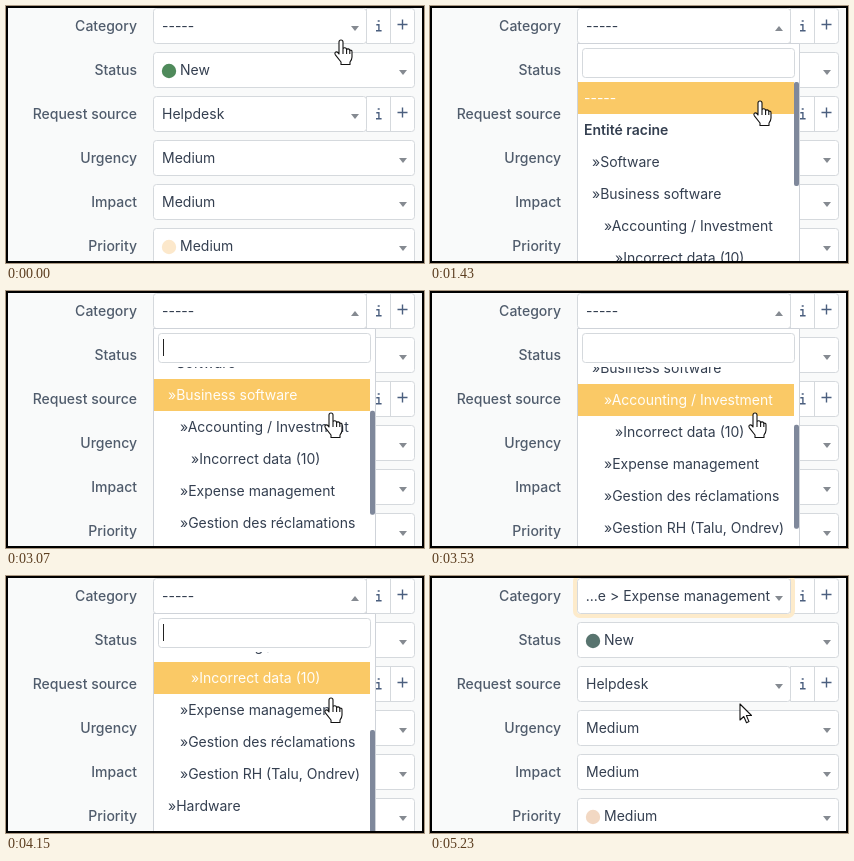
Write an HTML page that moves like this. It is 418 px wide and 257 px high and loops after 5590 ms.

```html
<!DOCTYPE html>
<html lang="en">
<head>
<meta charset="utf-8">
<title>Category picker</title>
<style>
  html, body { margin: 0; width: 100%; height: 100%; overflow: hidden; background: #f9fafa; }
  svg { display: block; }
  text { font: 14px Inter, sans-serif; fill: #343f50; white-space: pre; }
  .label { font-weight: 500; fill: #505c6c; text-anchor: end; }
  .group { font-weight: 600; }
  .active { fill: #fffdf8; }
  .box { fill: #fff; stroke: #d5d9dd; }
  .icon { fill: none; stroke: #4b5f7f; stroke-width: 1.4; }
  .arrow { fill: #858a91; }
  .cursor { fill: #fff; stroke: #111; stroke-width: 1.1; stroke-linejoin: round; }
</style>
</head>
<body>
<svg width="418" height="257" viewBox="0 0 418 257">
  <defs><clipPath id="listClip"><rect x="148" y="76" width="222" height="181"/></clipPath></defs>
  <rect width="418" height="257" fill="#f9fafa"/>
  <g id="form"></g>
  <rect id="glow" x="145" y="0" width="218" height="40" rx="5" fill="none" stroke="#fdebcb" stroke-width="4"/>
  <g id="panel">
    <path d="M147.5 37.5H369.5V276H147.5Z" fill="#fff" stroke="#cfd3d9"/>
    <rect class="box" x="152.5" y="42.5" width="212" height="29" rx="3"/>
    <path id="caret" d="M157.5 48V65" stroke="#222"/>
    <g clip-path="url(#listClip)">
      <g id="list"></g>
      <rect id="thumb" x="364" y="76" width="5" height="104" rx="2" fill="#7f889b"/>
    </g>
  </g>
  <g id="cursor" class="cursor">
    <path id="hand" d="M-2 14V2Q-2 0 0 0T2 2V9Q2.3 7.6 4 7.8T5.6 9.8Q6 8.6 7.4 8.9T8.8 10.8Q9.2 9.9 10.2 10.3T11 12V17Q11 19.5 9 22V24.5H0V22L-5.6 14.8Q-6.8 12.8 -5.2 12T-2 14ZM2 9V14M5.6 10V14M8.8 11V14"/>
    <path id="pointer" d="M0 0V16L3.8 12.5L6.5 18.7L9 17.6L6.4 11.5H11.5Z"/>
  </g>
  <rect x="1" y="1" width="416" height="255" fill="none" stroke="#000" stroke-width="2"/>
</svg>
<script>
const LOOP = 5590, ROW = 32;
const $ = id => document.getElementById(id);

const fields = [
  { label: "Category", value: "-----", id: "category", buttons: true },
  { label: "Status", value: "New", dot: "statusDot" },
  { label: "Request source", value: "Helpdesk", buttons: true },
  { label: "Urgency", value: "Medium" },
  { label: "Impact", value: "Medium" },
  { label: "Priority", value: "Medium", dot: "priorityDot" }
];
// label and x position of each option
const options = [
  ["-----", 154], ["Entité racine", 154], ["»Software", 162], ["»Business software", 162],
  ["»Accounting / Investment", 174], ["»Incorrect data (10)", 185], ["»Expense management", 174],
  ["»Gestion des réclamations", 174], ["»Gestion RH (Talu, Ondrev)", 174], ["»Hardware", 162]
];

const buttons = y => `
  <path class="box" d="M360.5 ${y - 17.5}H405.5Q408.5 ${y - 17.5} 408.5 ${y - 14.5}V${y + 14.5}Q408.5 ${y + 17.5} 405.5 ${y + 17.5}H360.5ZM384.5 ${y - 17.5}v35"/>
  <path class="icon" d="M371.7 ${y - 5}h2M370.3 ${y - 1.3}h2.6v6M370 ${y + 4.8}h5.6M391.5 ${y - 1.5}h10M396.5 ${y - 6.5}v10"/>`;

$("form").innerHTML = fields.map((f, i) => {
  const y = 20 + 44 * i, right = f.buttons ? 360.5 : 408.5, id = f.id || "field" + i;
  return `<text class="label" x="131" y="${y + 5}">${f.label}</text>
    ${f.buttons ? buttons(y) : ""}
    <rect class="box" x="147.5" y="${y - 17.5}" width="${right - 147.5}" height="35" rx="3"/>
    ${f.dot ? `<circle id="${f.dot}" cx="163" cy="${y + 1}" r="7.2"/>` : ""}
    <text id="${id}" x="${f.dot ? 174 : 156}" y="${y + 5}">${f.value}</text>
    <path id="${id}Arrow" class="arrow" d="M${right - 15.5} ${y}h8l-4 5z"/>`;
}).join("");

$("list").innerHTML = options.map(([name, x], i) => `
  <rect x="148" y="${76 + ROW * i}" width="216" height="${ROW}" fill="none"/>
  <text class="${i === 1 ? "group" : ""}" x="${x}" y="${97 + ROW * i}">${name}</text>`).join("");
const bars = $("list").querySelectorAll("rect"), names = $("list").querySelectorAll("text");

// progress that jumps n times from start to end, the first jump at start
function steps(t, start, end, n) {
  if (t < start) return 0;
  return Math.min(1, (Math.floor((t - start) / (end - start) * (n - 1) + 0.2) + 1) / n);
}
const easeOut = (k, power) => 1 - (1 - k) ** power;
const show = (id, on) => $(id).setAttribute("visibility", on ? "inherit" : "hidden");
const last = (t, keys) => keys.reduce((v, [at, value]) => t >= at ? value : v, null);

// start, end, steps of each 30 px wheel notch
const notches = [[1990, 2210, 4], [2530, 2610, 2], [2990, 3310, 5], [3530, 3690, 3], [3990, 4150, 3]];
const highlights = [[920, 0], [2600, 3], [3300, 4], [3990, 5], [4390, 6]];
const blinks = [620, 1150, 1670, 2210, 2750, 3300, 3850, 4390, 4910];
// start, end, steps, dx, dy, easing power
const moves = [
  [80, 220, 3, 6, -14, 1], [1070, 1590, 8, -13, 92, 1.2],
  [1670, 1750, 2, -3, 10, 1], [4390, 4610, 4, -15, 6, 1]
];

function render(t) {
  const open = t >= 620 && t < 4990, done = t >= 4990;

  const scroll = Math.round(notches.reduce((s, [a, b, n]) => s + 30 * easeOut(steps(t, a, b, n), 3), 0));
  $("list").setAttribute("transform", `translate(0 ${-scroll})`);
  $("thumb").setAttribute("y", 76 + 0.52 * scroll);
  const active = last(t, highlights);
  bars.forEach((bar, i) => bar.setAttribute("fill", i === active ? "#fac966" : "none"));
  names.forEach((name, i) => name.classList.toggle("active", i === active));
  show("panel", open);
  show("caret", blinks.filter(b => t >= b).length % 2 === 1);

  const category = $("category");
  category.textContent = done ? "...e > Expense management" : "-----";
  category.setAttribute("x", done ? 340 : 156);
  category.setAttribute("text-anchor", done ? "end" : "start");
  $("categoryArrow").setAttribute("d", open ? "M345 25h8l-4 -5z" : "M345 20h8l-4 5z");
  $("glow").setAttribute("opacity", steps(t, 4990, 5230, 4));
  $("statusDot").setAttribute("fill", done ? "#58746f" : "#4f8a5b");
  $("priorityDot").setAttribute("fill", done ? "#f2d8c3" : "#fce8cb");

  let x = 335, y = 34;
  for (const [a, b, n, dx, dy, power] of moves) {
    const k = easeOut(steps(t, a, b, n), power);
    x += dx * k;
    y += dy * k;
  }
  const pointer = t >= 1590 && t < 2600 || done;
  $("cursor").setAttribute("transform", `translate(${Math.round(x)} ${Math.round(y)})`);
  show("pointer", pointer);
  show("hand", !pointer);
}

const start = performance.now();
function tick() {
  render((performance.now() - start) % LOOP);
  requestAnimationFrame(tick);
}
tick();
</script>
</body>
</html>
```
